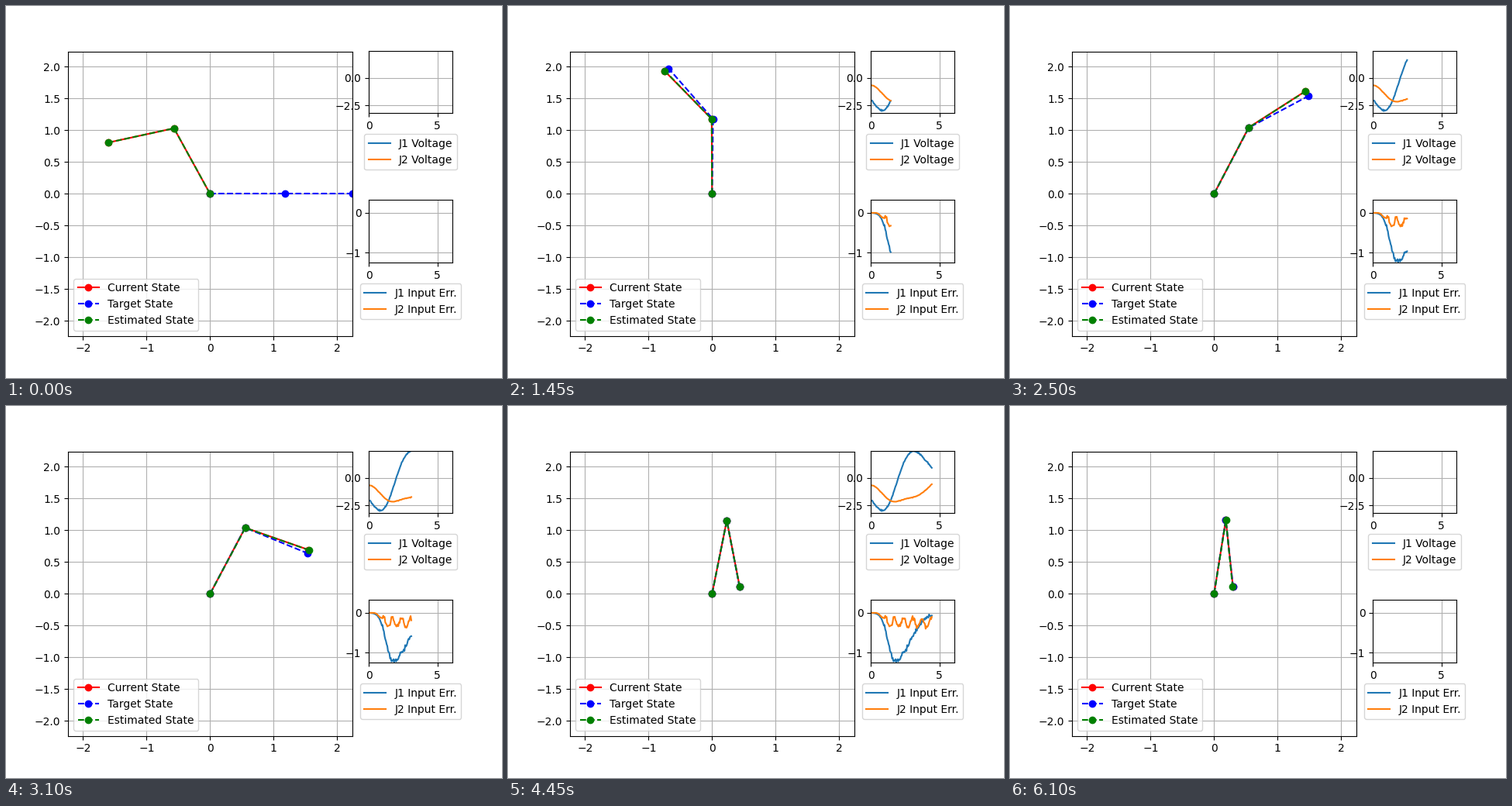
A matplotlib script that plays this animation: 640 by 480 pixels, repeating every 6.15 s.

```python
import numpy as np
import matplotlib.pyplot as plt
from matplotlib.animation import FuncAnimation

DT, FRAMES = 0.05, 123
L1, L2 = 1.178, 1.058
REACH = L1 + L2
MOVE_TIME = 5.27

t = np.arange(FRAMES) * DT
rng = np.random.default_rng(4)


def bell(center, width):
    return np.exp(-((t - center) / width)**2 / 2)


def jitter(size):
    return rng.normal(0, size, FRAMES)


def planned_angles():
    """Joint angles in degrees: minimum-jerk move, shoulder swings through."""
    s = np.clip(t / MOVE_TIME, 0, 1)
    ease = s**3 * (10 - 15 * s + 6 * s**2)
    swing = (3850 - 2750 * s) * (s * (1 - s))**3
    return 118.8 - 37.8 * ease - swing, 73.4 - 238.2 * ease


def arm_points(q1, q2):
    a, b = np.radians(q1), np.radians(q1 + q2)
    ex, ey = L1 * np.cos(a), L1 * np.sin(a)
    zero = np.zeros_like(ex)
    return (np.stack([zero, ex, ex + L2 * np.cos(b)], axis=1),
            np.stack([zero, ey, ey + L2 * np.sin(b)], axis=1))


def motor_volts(q1, q2):
    """Gravity load plus back EMF, and inertia at the shoulder."""
    w1, w2 = np.gradient(q1, DT), np.gradient(q2, DT)
    fore = .69 * np.cos(np.radians(q1 + q2))
    upper = 2.75 * np.cos(np.radians(q1))
    v1 = upper + fore + .045 * w1 + .005 * np.gradient(w1, DT)
    v2 = fore + .03 * w2
    return [v1 + jitter(.03), v2 + jitter(.012)]


def input_errors():
    onset = 1 - np.exp(-t**4)
    dip = -1.22 * bell(1.75, np.where(t < 1.75, .48, 1.08))
    ripple = -.24 - .11 * np.cos(2 * np.pi * (t - 1.38) / .67)
    fade = 1 / (1 + np.exp(4 * (t - 5)))
    return [dip + onset * jitter(.03),
            onset * (ripple * fade + jitter(.03))]


plan1, plan2 = planned_angles()
volts = motor_volts(plan1, plan2)
errors = input_errors()

# The arm trails the plan; the estimate scatters around the arm
real1 = plan1 + bell(1.6, .5)
real2 = plan2 + 4.5 * bell(2.4, .8)
est1, est2 = real1 + jitter(.25), real2 + jitter(.25)
est1[0], est2[0] = real1[0], real2[0]
plan1[0] = plan2[0] = 0
poses = [arm_points(real1, real2), arm_points(plan1, plan2),
         arm_points(est1, est2)]

# Layout
fig = plt.figure(figsize=(6.4, 4.8), dpi=100)

ax = plt.subplot2grid((4, 4), (0, 0), rowspan=4, colspan=3)
ax.set_xlim(-REACH, REACH)
ax.set_ylim(-REACH, REACH)
ax.set_aspect("equal")
ax.set_xticks(range(-2, 3))
ax.set_yticks(np.arange(-2, 2.1, .5))
ax.grid()
arms = [ax.plot([], [], style, label=label + " State")[0]
        for style, label in [("ro-", "Current"), ("bo--", "Target"),
                             ("go--", "Estimated")]]
ax.legend(loc="lower left")


def trace_panel(row, ylim, yticks, what):
    panel = plt.subplot2grid((4, 4), (row, 3))
    panel.set_xlim(0, t[-1])
    panel.set_ylim(*ylim)
    panel.set_xticks([0, 5])
    panel.set_yticks(yticks)
    panel.grid()
    lines = [panel.plot([], [], label=f"J{j} {what}")[0] for j in (1, 2)]
    panel.legend(loc="lower center", bbox_to_anchor=(.5, -1))
    return lines


traces = (trace_panel(0, (-3.17, 2.46), [-2.5, 0], "Voltage")
          + trace_panel(2, (-1.245, .32), [-1, 0], "Input Err."))


def update(i):
    for line, (x, y) in zip(arms, poses):
        line.set_data(x[i], y[i])
    # Traces clear on the last step
    end = 0 if i == FRAMES - 1 else i + 1
    for line, values in zip(traces, volts + errors):
        line.set_data(t[2:end], values[2:end])
    return arms + traces


anim = FuncAnimation(fig, update, frames=FRAMES, interval=50, repeat=True,
                     repeat_delay=0)
plt.show()
```
